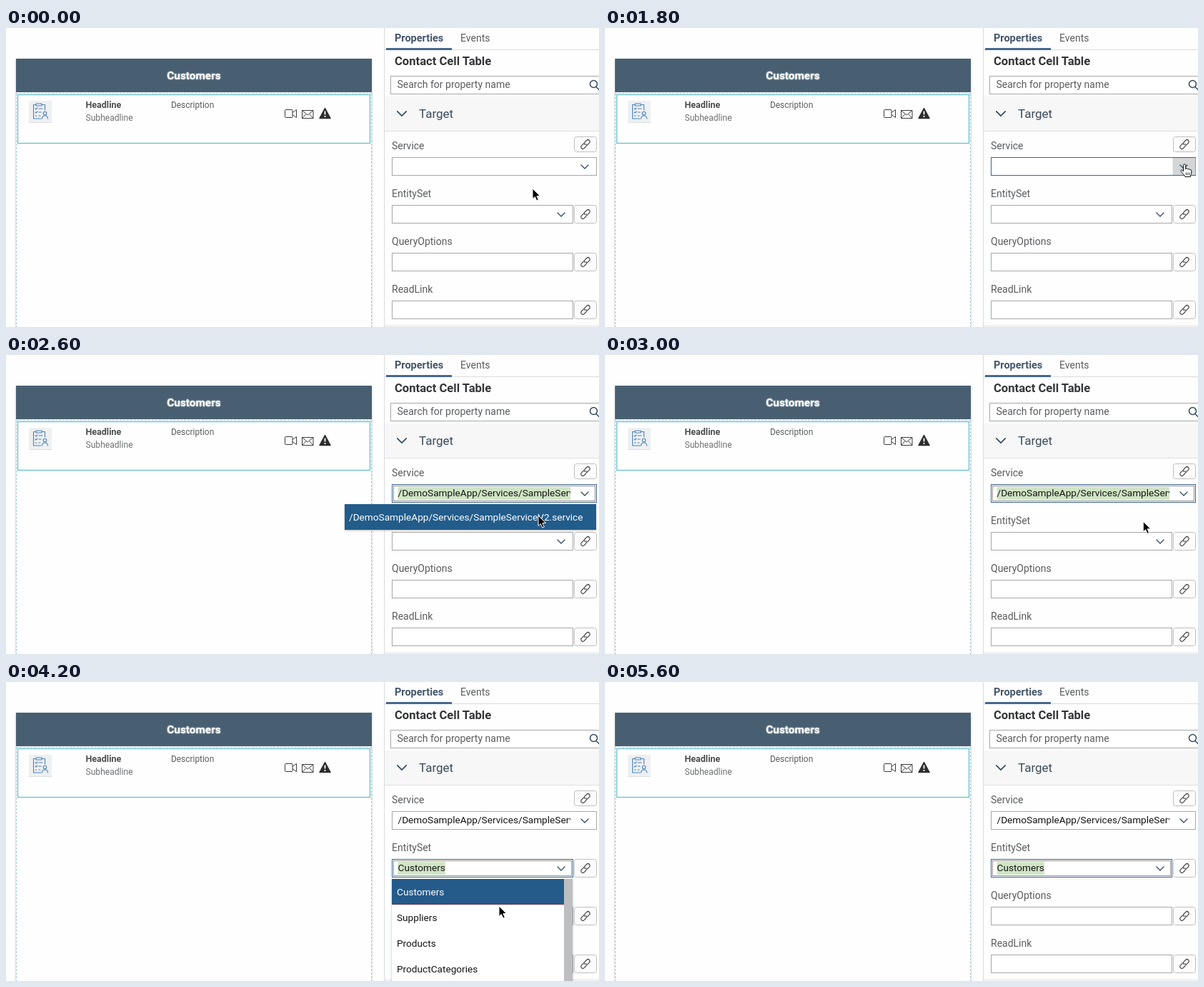
Write an HTML page that moves like this. It is 830x419 px and loops after 5.8 s.

```html
<!DOCTYPE html>
<html lang="en">
<head>
<meta charset="utf-8">
<title>Binding a table</title>
<style>
html, body { margin: 0; width: 100%; height: 100%; overflow: hidden; background: #fefefe; }
svg { display: block; width: 830px; height: 419px; }
text { font: 14px Roboto, "Open Sans", sans-serif; fill: #5a5c5e; }
.bold { font-weight: bold; }
.value { font-size: 13.65px; fill: #151515; }
.lit { fill: #fff; }
.line { fill: none; stroke: #33495e; stroke-width: 1.3; stroke-linecap: round; stroke-linejoin: round; }
.thin { fill: none; stroke: #3b3b3b; stroke-width: 1; }
.field { fill: #fff; stroke: #a5a7a9; }
.field.active { stroke: #3e638c; }
.button { fill: #fcfcfc; stroke: #bfbfbf; }
.dots { fill: none; stroke: #222; stroke-dasharray: 1 1; }
</style>
</head>
<body>
<svg viewBox="0 0 830 419">
  <defs>
    <filter id="shade" x="-10%" y="-10%" width="120%" height="120%">
      <feDropShadow dx="0" dy="1" stdDeviation="1.5" flood-opacity=".25"/>
    </filter>
    <clipPath id="clip"><path d="M545 183H790V206H545z"/></clipPath>
    <path id="chevron" class="line" d="M-5 -2.5L0 2.5L5 -2.5"/>
    <g id="link" class="line" transform="rotate(-45)" style="stroke:#444;stroke-width:1.2">
      <path d="M-1 -2.5H-5.2a2.6 2.6 0 0 0 0 5.2H-1.5a2.6 2.6 0 0 0 2.4 -2.4"/>
      <path d="M1 2.5H5.2a2.6 2.6 0 0 0 0 -5.2H1.5a2.6 2.6 0 0 0 -2.4 2.4"/>
    </g>
  </defs>

  <!-- preview card -->
  <rect x="14" y="43" width="498" height="400" fill="#fefefe" filter="url(#shade)"/>
  <path d="M14 43H512V90H14z" fill="#485f71"/>
  <path d="M14.5 92V419M511.5 92V419M14 91.5H512" fill="none" stroke="#a9cbd8" stroke-dasharray="3 2"/>
  <rect x="16.5" y="93.5" width="493" height="68" fill="#fefefe" stroke="#5fbdcc" stroke-width="1.2"/>
  <text class="bold lit" x="263" y="72" text-anchor="middle" style="font-size:15.4px;text-shadow:0 0 2px #dde6ee">Customers</text>
  <rect x="32" y="102" width="32" height="31" fill="#eef0f2"/>
  <path d="M32 132.5H64" stroke="#dcdfe2"/>
  <g class="line" style="stroke:#4f83b8;stroke-width:1.1">
    <path d="M49 127H38.5V107.500H42M50 107.500H54.500V115M42 106H50V109H42zM41 113l1 1 2-2M46 113H51M41 118l1 1 2-2M46 118H49M41 123h2M46 123H48"/>
    <circle cx="54.500" cy="119.500" r="2.300"/>
    <path d="M50.500 127q0-4 4-4t4 4"/>
  </g>
  <text class="bold" x="111.500" y="112" style="font-size:12.5px;fill:#4b4d4f">Headline</text>
  <text x="111.500" y="130" style="font-size:12.1px;fill:#6e7072">Subheadline</text>
  <text x="231" y="112" style="font-size:11.9px">Description</text>
  <g class="thin">
    <rect x="390.500" y="114.500" width="10.500" height="11" rx="1"/>
    <path d="M401 118.500L406.500 114.500V125.500L401 121.500"/>
    <path d="M414.500 115.500H430V126.500H414.500zL422.200 122L430 115.500M414.500 126.500L420 120.500M430 126.500L424.500 120.500"/>
  </g>
  <path d="M446.500 112.500L454 126.500H439z" fill="#2d2d2d" stroke="#2d2d2d" stroke-width="1.500" stroke-linejoin="round"/>
  <path d="M446.500 116.500V121.500M446.500 123V125" stroke="#fff" stroke-width="1.800"/>

  <!-- property panel -->
  <path d="M529.500 0V419M530 30.500H830" stroke="#d9dadb"/>
  <path d="M532 28H624V31H532z" fill="#45688f"/>
  <text class="bold" x="544" y="19" style="font-size:14.5px;fill:#44566b">Properties</text>
  <text x="636" y="19">Events</text>
  <text class="bold" x="544" y="52" style="font-size:16.6px;fill:#333537">Contact Cell Table</text>
  <rect class="field" x="538.500" y="67.500" width="300" height="25"/>
  <text x="547.500" y="84" font-style="italic">Search for property name</text>
  <g class="line" style="stroke-width:1.500"><circle cx="822.500" cy="78.500" r="5"/><path d="M826 82.500L831 87.500"/></g>
  <path d="M530 96H830V144H530z" fill="#f7f7f8"/>
  <path d="M530 144.500H830" stroke="#e0e1e2"/>
  <use href="#chevron" transform="translate(554 120) scale(1.250)"/>
  <text x="578" y="126" style="font-size:17px;fill:#3b4a59">Target</text>
  <path d="M530 416H830V419H530z" fill="#f1f1f2"/>

  <g id="form"></g>
  <g id="cursor"></g>
</svg>
<script>
const LOOP = 5800, STEP = 200;
const form = document.getElementById('form');
const cursor = document.getElementById('cursor');
const service = '/DemoSampleApp/Services/SampleServiceV2.service';
const sets = ['Customers', 'Suppliers', 'Products', 'ProductCategories'];

// time, x, y of the pointer tip
const route = [
  [0, 737, 225], [400, 742, 222], [1200, 811, 191], [2000, 811, 191], [2600, 745, 225],
  [2800, 745, 225], [3400, 777, 257], [3800, 777, 257], [4200, 690, 314],
  [4400, 690, 314], [4800, 693, 298], [5000, 693, 298], [5600, 700, 440]
];

const arrow = `<path d="M0 0V14.500L3.300 11.500L5.800 17L8.300 16L5.900 10.500H10.500z"
  fill="#000" stroke="#fff" stroke-linejoin="round"/>`;
const hand = `<path d="M-1.500 10V1.500a1.600 1.600 0 0 1 3.200 0V7c0-1.500 3-1.500 3 .2c.5-1 2.700-.8 2.800.6
  c.6-.8 2.300-.4 2.300 1V12c0 2-1.500 3-1.500 5.500H1C.5 15-3 13-5 9.500c-.6-1.600 1.500-2.200 2.300-1z"
  fill="#fff" stroke="#111" stroke-linejoin="round"/><path d="M2.500 11.500V15M4.700 11.500V15M6.900 11.500V15" stroke="#111" stroke-width=".8"/>`;

const rect = (x, y, w, h, attrs) => `<rect x="${x}" y="${y}" width="${w}" height="${h}" ${attrs}/>`;
const text = (x, y, s, cls = '') => `<text x="${x}" y="${y}" class="${cls}">${s}</text>`;
const use = (id, x, y) => `<use href="#${id}" x="${x}" y="${y}"/>`;
const linkButton = (y, h) => rect(795.5, y + .5, 31, h, 'rx="3" class="button"') + use('link', 811, y + h / 2 + .5);

function pointerAt(t) {
  const i = Math.max(1, route.findIndex(p => p[0] >= t));
  const [a, b] = [route[i - 1], route[i]] ;
  if (!b) return [700, 440];
  const k = (t - a[0]) / (b[0] - a[0]), e = k * k * (3 - 2 * k);
  return [a[1] + (b[1] - a[1]) * e, a[2] + (b[2] - a[2]) * e];
}

function combo(y, right, { hover, focus, value, mark }) {
  let s = rect(540.5, y + .5, right - 540.5, 25, `class="field ${hover || focus ? 'active' : ''}"`);
  if (hover) s += rect(right - 32, y + 1, 32, 24, 'fill="#d3d5d7"');
  if (focus) s += rect(542.5, y + 2.5, right - 544.5, 21, 'class="dots"');
  if (focus && value) s += rect(548.5, y + 4, mark, 18, 'fill="#d0e5c5"');
  if (value) s += `<g ${value === service ? 'clip-path="url(#clip)"' : ''}>${text(548.5, y + 17, value, 'value')}</g>`;
  return s + use('chevron', right - 16.5, y + 13.5);
}

function serviceList(chosen) {
  return rect(474, 209, 352, 36, `fill="${chosen ? '#245b8b' : '#f4f5f6'}" filter="url(#shade)"`) +
    text(480, 232, service, chosen ? 'value lit' : 'value');
}

function setList(chosen) {
  let s = rect(540, 276, 253, 160, 'fill="#fff" filter="url(#shade)"');
  if (chosen) s += rect(540, 276, 241, 36, 'fill="#245b8b"') + rect(540, 311, 241, 1, 'fill="#5b3a55"');
  s += rect(781, 276, 12, 150, 'fill="#bdbebf"');
  return s + sets.map((name, i) => text(547, 299 + 36 * i, name, chosen && !i ? 'value lit' : 'value')).join('');
}

function draw(t) {
  const [x, y] = pointerAt(t);
  const inside = (left, top) => x >= left && x < left + 32 && y >= top && y < top + 25;
  const over1 = inside(794, 181), over2 = inside(761, 248);
  const within = (from, to) => t >= from && t < to;

  let s = text(540, 170, 'Service') + text(540, 237, 'EntitySet') +
    text(540, 304, 'QueryOptions') + text(540, 371, 'ReadLink');
  s += linkButton(152, 21) + [248, 315, 382].map(top => linkButton(top, 25)).join('');
  s += combo(181, 826.5, { hover: over1, focus: within(2000, 3600), value: t >= 2600 && service, mark: 241.5 });
  s += combo(248, 793.5, { hover: over2, focus: t >= 3800, value: t >= 4200 && sets[0], mark: 66.5 });
  for (const top of [315, 382]) s += rect(540.5, top + .5, 253, 25, 'class="field"');
  if (within(2000, 2800)) s += serviceList(t >= 2600);
  if (within(3800, 4400)) s += setList(t >= 4200);
  form.innerHTML = s;

  cursor.innerHTML = over1 || over2 ? hand : arrow;
  cursor.setAttribute('transform', `translate(${x} ${y})`);
}

let last = -1;
function tick() {
  const t = Math.floor(performance.now() % LOOP / STEP) * STEP;
  if (t !== last) draw(last = t);
  requestAnimationFrame(tick);
}
tick();
</script>
</body>
</html>
```
